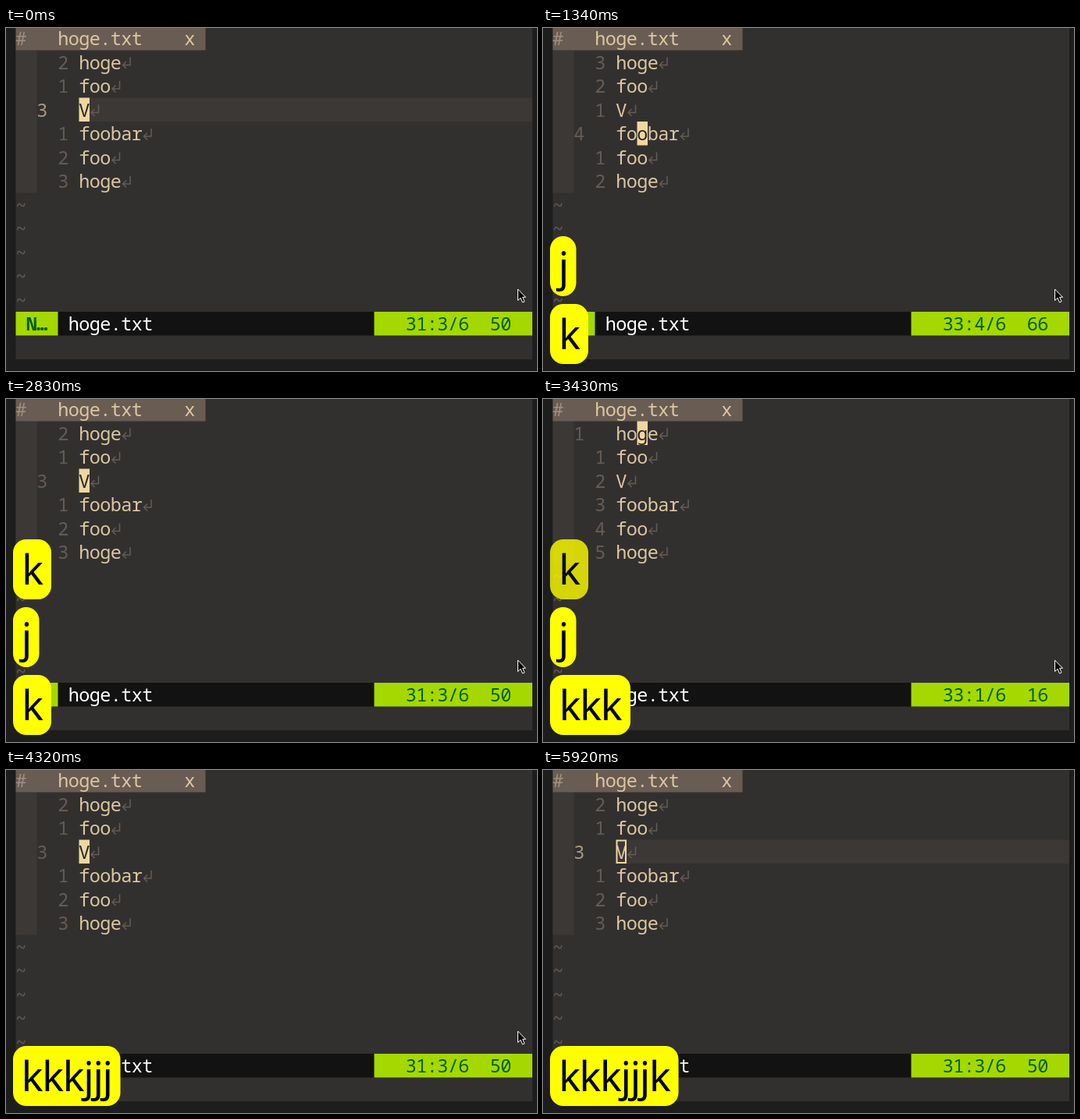
Recreate the animation shown at these times as an HTML page. Size 680 by 440 pixels, loop 6020 ms.

```html
<!DOCTYPE html>
<html lang="en">
<head>
<meta charset="utf-8">
<title>Editor key presses</title>
<style>
  html, body { margin: 0; width: 100%; height: 100%; overflow: hidden; background: #1d1d1d; }
  svg { display: block; }
  text { font: 23.5px "Noto Sans Mono", "Liberation Mono", monospace; letter-spacing: -.6px; white-space: pre; }
  .mode { font-weight: bold; }
  .key text { font: 52px "Noto Sans", "Open Sans", sans-serif; letter-spacing: -1.3px; }
</style>
</head>
<body>
<svg id="stage" width="680" height="440" viewBox="0 0 680 440"></svg>
<script>
const LOOP = 6020, CELL = 13.5, ROW = 30.5, LEFT = 12.5, TOP = -2;
const BG = '#32302f', FG = '#ddc7a1', DIM = '#665c54', LINE = '#3c3836',
      CURSOR = '#efd79f', GREEN = '#a4d800', DARK_GREEN = '#005f00';
const lines = ['hoge', 'foo', 'V', 'foobar', 'foo', 'hoge'];

// [start, cursor line, key boxes from top to bottom ("~" = fading)]
const steps = [
  [0, 3, ''], [750, 4, 'j'], [1340, 4, 'j k'], [1490, 3, 'j k'],
  [1930, 4, 'j k j'], [2530, 3, 'j k j k'], [2680, 3, '~j k j k'],
  [2830, 3, 'k j k'], [2980, 2, 'k j kk'], [3280, 1, 'k j kkk'],
  [3430, 1, '~k j kkk'], [3580, 1, 'j kkk'], [3730, 2, 'j kkkj'],
  [3870, 2, '~j kkkjj'], [4020, 3, 'kkkjj'], [4320, 3, 'kkkjjj'],
  [4470, 4, 'kkkjjj'], [4760, 3, 'kkkjjjk']
];
const mouseSteps = [[0, 334.5], [5210, 359.5], [5350, 434], [5500, 460]];

const at = (list, t) => list.findLast(s => s[0] <= t);
const colX = c => LEFT + c * CELL;
const rowY = r => TOP + r * ROW;
const rect = (x, y, w, h, fill, more = '') =>
  `<rect x="${x}" y="${y}" width="${w}" height="${h}" fill="${fill}" ${more}/>`;
const cells = (c, r, n, fill, rows = 1) => rect(colX(c), rowY(r), n * CELL, rows * ROW, fill);
const write = (c, r, str, fill, more = '') =>
  `<text x="${colX(c) - 0.3}" y="${rowY(r) + 24}" fill="${fill}" ${more}>${str}</text>`;
const lineEnd = (c, r) =>
  `<path transform="translate(${colX(c)} ${rowY(r)})" d="M11.5 9V19H2M6.5 14.5L2 19L6.5 23.5" fill="none" stroke="${DIM}" stroke-width="1.5"/>`;

function keyBox(label, i, count) {
  const fading = label[0] === '~', str = label.replace('~', '');
  const width = [...str].reduce((w, ch) => w + (ch === 'k' ? 27 : 11.5), 22);
  const y = 354 - 87 * (count - 1 - i);
  return `<g class="key" opacity="${fading ? 0.8 : 1}">` +
    rect(9, y, width, 77, '#ff0', 'rx="17"') +
    `<text x="${9 + width / 2}" y="${y + 57.5}" text-anchor="middle">${str}</text></g>`;
}

function editor(current, held, hollow) {
  const col = current === 3 ? 1 : 3;
  let out = rect(LEFT, 0, 661.5, 425, BG) + cells(0, 1, 2, LINE, 6);
  if (held) out += cells(6, current, 43, LINE);

  out += cells(0, 0, 18, '#695c53') + write(0, 0, '#', '#a08f7d') +
    write(4, 0, 'hoge.txt', FG) + write(16, 0, 'x', FG);

  lines.forEach((str, i) => {
    const r = i + 1, here = r === current;
    out += write(here ? 2 : 4, r, here ? r : Math.abs(r - current), here && held ? '#a89984' : DIM) +
      write(6, r, str, FG) + lineEnd(6 + str.length, r);
  });

  const c = 5 + col;
  if (hollow) {
    out += rect(colX(c) + 1, rowY(current) + 1, CELL - 2, ROW - 2, 'none', `stroke="${CURSOR}" stroke-width="2"`);
  } else {
    out += cells(c, current, 1, CURSOR) + write(c, current, lines[current - 1][col - 1], '#282625');
  }

  for (let r = 7; r < 12; r++) out += write(0, r, '~', DIM);

  const percent = Math.floor(current * 100 / 6);
  return out + cells(0, 12, 49, '#121212') + cells(0, 12, 4, GREEN) + cells(34, 12, 15, GREEN) +
    write(1, 12, 'N…', DARK_GREEN, 'class="mode"') +
    write(5, 12, 'hoge.txt', '#fff') +
    write(37, 12, `3${col}:${current}/6  ${percent}`, DARK_GREEN);
}

const stage = document.getElementById('stage');
let shown = '';

function draw(now) {
  const t = now % LOOP, [, current, keys] = at(steps, t);
  const labels = keys ? keys.split(' ') : [];
  const picture = editor(current, t < 750 || t >= 5800, t >= 5920) +
    labels.map((label, i) => keyBox(label, i, labels.length)).join('') +
    `<path transform="translate(655 ${at(mouseSteps, t)[1]})" d="M.5 .5V15L4 11.8L6.5 17.5L9 16.4L6.6 10.8H10.5Z" stroke="#fff"/>`;
  if (picture !== shown) stage.innerHTML = shown = picture;
}

const start = performance.now();
function tick() {
  draw(performance.now() - start);
  requestAnimationFrame(tick);
}
tick();
</script>
</body>
</html>
```
